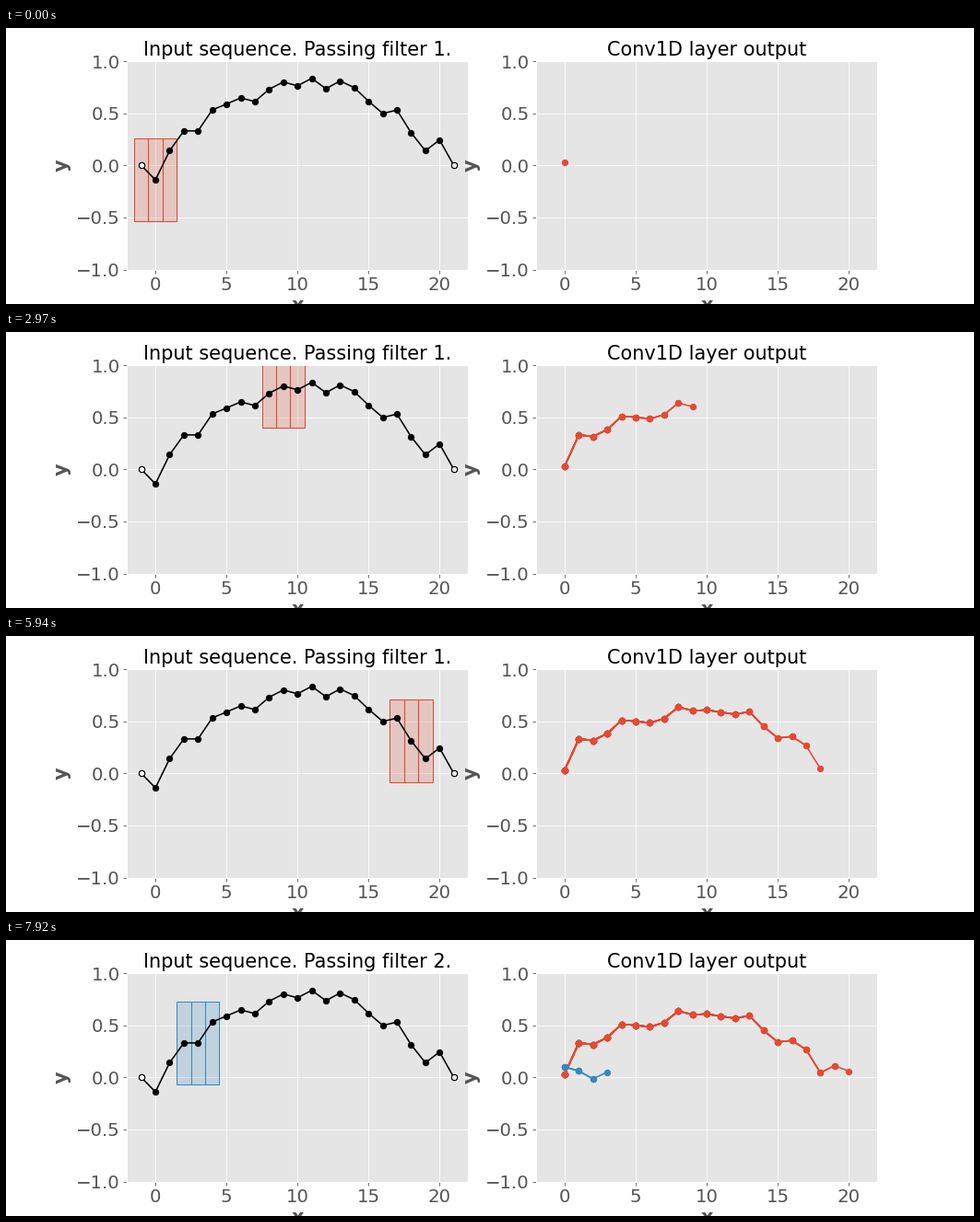
Write a matplotlib script that moves like this. It is 1050x300 px and loops after 8000 ms.

```python
import numpy as np
import matplotlib.pyplot as plt
from matplotlib.animation import FuncAnimation
from matplotlib.patches import Rectangle

LOOP_MS, STEP_MS, TICK_MS = 8000, 330, 40
STEPS = LOOP_MS // STEP_MS + 1
GREY = "#555555"
COLORS = ["#E24A33", "#348ABD"]
KERNELS = [(-0.355, 0.446, 0.66), (-0.013, -0.377, 0.337)]
BOX_H = 0.8

signal = np.array([
    -0.14, 0.14, 0.33, 0.33, 0.532, 0.588, 0.647, 0.612, 0.73, 0.80, 0.763,
    0.835, 0.735, 0.81, 0.745, 0.615, 0.498, 0.53, 0.312, 0.14, 0.243])
n = len(signal)
xs = np.arange(n)
padded = np.pad(signal, 1)
outputs = [np.correlate(padded, k, mode="valid") for k in KERNELS]

plt.rcParams.update({
    "font.family": "DejaVu Sans",
    "axes.facecolor": "#E5E5E5", "axes.edgecolor": "white",
    "axes.linewidth": 1, "axes.axisbelow": True,
    "axes.grid": True, "grid.color": "white", "grid.linewidth": 0.8,
    "axes.titlesize": 20, "axes.labelsize": 20,
    "axes.labelweight": "bold", "axes.labelcolor": GREY,
    "xtick.labelsize": 19, "ytick.labelsize": 19,
    "xtick.color": GREY, "ytick.color": GREY,
    "lines.linewidth": 1.5, "lines.markersize": 6,
})

fig, (left, right) = plt.subplots(1, 2, figsize=(14, 4), dpi=75)
fig.subplots_adjust(left=0.125, right=0.9, bottom=0.125, top=0.88, wspace=0.2)

for ax in (left, right):
    ax.set(xlim=(-2, 22), ylim=(-1, 1),
           xticks=range(0, 21, 5), yticks=np.arange(-1, 1.1, 0.5))
    ax.set_xlabel("x", labelpad=3)
    ax.set_ylabel("y", labelpad=5)
title = left.set_title("")
right.set_title("Conv1D layer output")

left.plot(np.arange(-1, n + 1), padded, "o-", color="black")
left.plot([-1, n], [0, 0], "o", color="white", mec="black", mew=1)

cells = [left.add_patch(Rectangle((0, 0), 1, BOX_H, lw=1)) for _ in range(3)]

# Each step plots the output so far over the earlier ones.
traces = []
for step in range(STEPS):
    f, i = divmod(step, n)
    traces += right.plot(xs[:i + 1], outputs[f][:i + 1], "o-", color=COLORS[f])


def update(frame):
    step = ((frame + 1) * TICK_MS - 1) // STEP_MS
    f, i = divmod(step, n)
    title.set_text(f"Input sequence. Passing filter {f + 1}.")
    for j, cell in enumerate(cells):
        cell.set_xy((i - 1.5 + j, signal[i] - BOX_H / 2))
        cell.set_facecolor((COLORS[f], 0.2))
        cell.set_edgecolor(COLORS[f])
    for k, trace in enumerate(traces):
        trace.set_visible(k <= step)
    return [title, *cells, *traces]


anim = FuncAnimation(fig, update, frames=LOOP_MS // TICK_MS,
                     interval=TICK_MS, repeat=True, repeat_delay=0)
plt.show()
```
